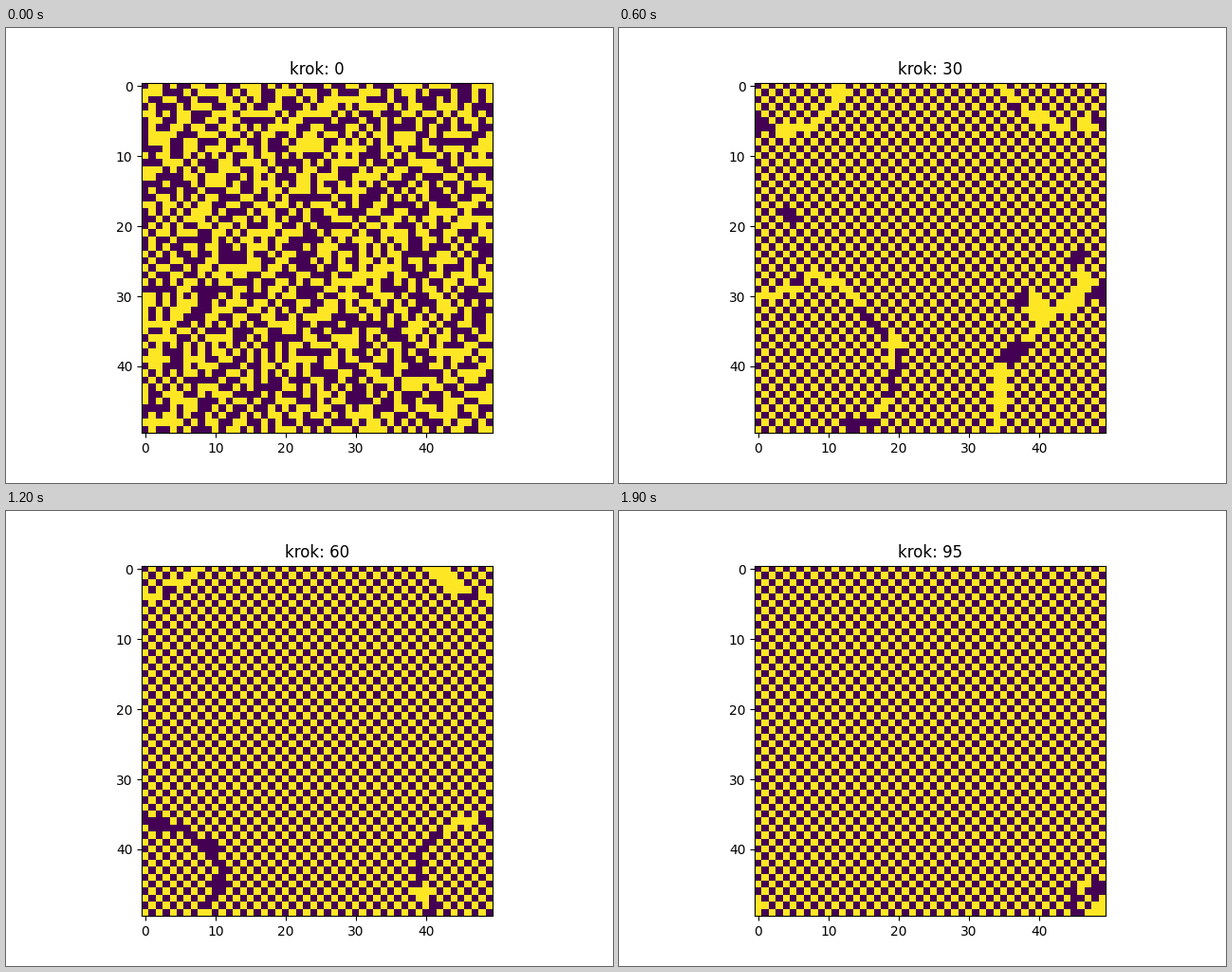
Write a matplotlib script that moves like this. It is 640 px wide and 480 px high and loops after 2000 ms.

```python
import numpy as np
import matplotlib.pyplot as plt
from matplotlib.animation import FuncAnimation

N = 50
FRAMES = 20
STEP = 5
ALONE = 8       # from here on a single domain is left

rng = np.random.default_rng(7)
phase_noise = rng.standard_normal((N, N))
tint_noise = rng.standard_normal((N, N))

row, col = np.mgrid[:N, :N]
odd = (row + col) % 2 == 1


def smooth(field, sigma):
    """Periodic Gaussian blur, scaled to unit spread."""
    f = np.fft.fftfreq(N)
    gain = np.exp(-2 * (np.pi * sigma) ** 2 * (f[:, None] ** 2 + f ** 2))
    out = np.fft.ifft2(np.fft.fft2(field) * gain).real
    return out / out.std()


def wrapped(d):
    return (d + N / 2) % N - N / 2


def coarsening(k):
    """Many small domains whose size grows with the square root of time."""
    sigma = 0.38 + 0.95 * np.sqrt(k)
    return smooth(phase_noise, sigma) * sigma * np.sqrt(2)


def last_domain(k):
    """Signed depth inside the round domain that shrinks into the corner."""
    age = k - ALONE
    dx = wrapped(col - (51 - 0.35 * age)) / 1.1
    dy = wrapped(row - (43 + 0.4 * age)) * 1.1
    angle = np.arctan2(dy, dx)
    radius = (14 - 1.06 * age) * (1 + 0.06 * np.cos(3 * angle + 1))
    return radius - np.hypot(dx, dy)


def board(k):
    w = np.clip((k - 3) / (ALONE - 3), 0, 1)
    w = w * w * (3 - 2 * w)
    depth = (1 - w) * coarsening(k) + w * np.clip(last_domain(k), -6, 6)

    # Both checkerboards swap colours from one picture to the next.
    grid = odd ^ (depth > 0) ^ (k % 2 == 0)

    # Walls between domains are runs of a single colour.
    wall = abs(depth) < 0.55 * min(1, k / 4)
    tint = smooth(np.roll(tint_noise, 3 * k, axis=1), 1.5) > -0.3
    return np.where(wall, tint, grid).astype(float)


fig, ax = plt.subplots(figsize=(6.4, 4.8), dpi=100)
image = ax.imshow(board(0), cmap="viridis", vmin=0, vmax=1)
title = ax.set_title("krok: 0")


def update(k):
    image.set_data(board(k))
    title.set_text(f"krok: {k * STEP}")
    return image, title


anim = FuncAnimation(fig, update, frames=FRAMES, interval=100,
                     repeat=True, repeat_delay=0, blit=False)
plt.show()
```
